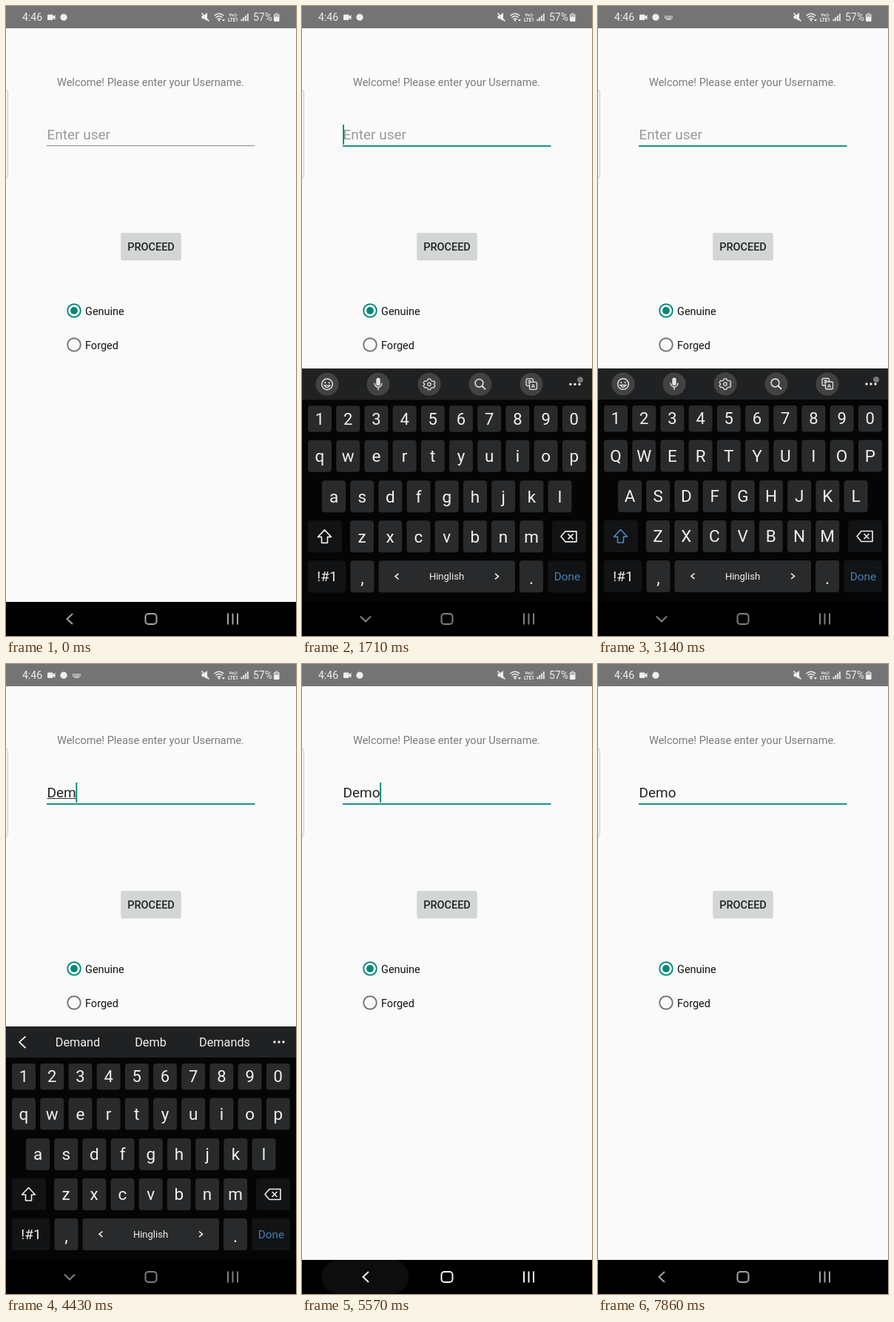
An HTML page for the animation above (8 s loop, 392 by 850 pixels).

```html
<!DOCTYPE html>
<html>
<head>
<meta charset="utf-8">
<style>
html, body { margin: 0; width: 100%; height: 100%; overflow: hidden; background: #fafafa }
svg { display: block; width: 392px; height: 850px; font-family: Roboto, "Noto Sans", sans-serif }
</style>
</head>
<body>
<svg id="stage" viewBox="0 0 392 850"></svg>
<script>
const TEAL = '#048878', KEY = '#292a2b', FUNC = '#121314', LIGHT = '#f0f0f0';
const stage = document.getElementById('stage');
const $ = id => document.getElementById(id);

const text = (x, y, s, size, fill, extra = '') =>
  `<text x="${x}" y="${y}" font-size="${size}" fill="${fill}" ${extra}>${s}</text>`;
const mid = (x, y, s, size, fill, extra = '') => text(x, y, s, size, fill, 'text-anchor="middle" ' + extra);
const rect = (x, y, w, h, fill, r = 0, extra = '') =>
  `<rect x="${x}" y="${y}" width="${w}" height="${h}" rx="${r}" fill="${fill}" ${extra}/>`;
const circle = (x, y, r, fill, extra = '') => `<circle cx="${x}" cy="${y}" r="${r}" fill="${fill}" ${extra}/>`;
const line = (d, color, w = 1.5, extra = '') =>
  `<path d="${d}" fill="none" stroke="${color}" stroke-width="${w}" ${extra}/>`;
const fill = (d, color) => `<path d="${d}" fill="${color}"/>`;
const group = (id, body) => `<g id="${id}">${body}</g>`;

function statusBar() {
  const c = '#eee';
  const bars = [0, 1, 2, 3].map(i => rect(317.5 + i * 2.8, 17.5 - i * 2.4, 1.8, 2.8 + i * 2.4, c)).join('');
  const dots = [0, 1, 2, 3, 4, 5].map(i => rect(90 + i * 1.9, 13.2, 1.3, 1.4, c) + rect(90 + i * 1.9, 15.4, 1.3, 1.4, c)).join('');
  return rect(0, 0, 392, 30, '#747474') + text(22, 20, '4:46', 14, c)
    + rect(56, 11.5, 7.5, 7.5, c, 1) + fill('M63 14.5L66.5 12V18.5L63 16Z', c)
    + circle(78, 15.2, 4.6, c)
    + group('keyIcon', dots + rect(92, 17.4, 7, 1.2, c))
    + fill('M264.5 13H267L272 9V20L267 17H264.5Z', c) + line('M264.5 9.5L274.5 20.5', c)
    + line('M281.5 13Q288 7.5 294.5 13M283.5 15.5Q288 11.5 292.5 15.5M285.5 18Q288 15.8 290.5 18', c, 1.4)
    + circle(288, 19.5, 1.2, c) + fill('M292 18h4l-2 3z', c)
    + mid(307, 14.2, 'Vo))', 6, c, 'font-weight="700"') + mid(307, 21.3, 'LTE1', 6.4, c, 'font-weight="700"')
    + bars + text(334, 20, '57%', 14, c)
    + rect(362, 11, 7.5, 10, c, 1) + rect(364, 9.2, 3.5, 2, '#b5b5b5') + rect(363, 11.6, 5.5, 3, '#aaa');
}

const radio = (id, y, label) => circle(92, y, 0, '#000', `id="${id}Ripple"`)
  + circle(92, y, 8.8, 'none', `id="${id}Ring" stroke-width="1.9"`)
  + circle(92, y, 0, TEAL, `id="${id}Dot"`) + text(107, y + 5.6, label, 14.5, '#111');

function form() {
  return rect(-8, 113.5, 10.5, 119, '#f4f4f4', 3, 'stroke="#ccc"')
    + mid(195.5, 108, 'Welcome! Please enter your Username.', 14.55, '#7b7b7b')
    + text(55.5, 180, '', 19, '#222', 'id="user"')
    + rect(55.5, 181, 0, 1, '#333', 0, 'id="compose"')
    + rect(55, 188, 281.5, 1, '#888', 0, 'id="under"')
    + rect(55, 160, 1.9, 27, TEAL, 0, 'id="caret"')
    + rect(155.5, 307.5, 81, 36, '#000', 2, 'opacity=".09"') + rect(155, 306.5, 82, 36.5, '#000', 2, 'opacity=".08"')
    + rect(156, 306, 80, 36, '#d3d7d4', 1.5)
    + mid(196, 329.5, 'PROCEED', 14.5, '#222', 'font-weight="500"')
    + radio('genuine', 411, 'Genuine') + radio('forged', 457, 'Forged');
}

function tools() {
  const c = '#e4e4e4';
  const gear = line('M170.2 502.5h3.6l.8 2.3 2.3 1.3 2.3-.5 1.8 3-1.7 1.7v1l1.7 1.7-1.8 3-2.3-.5-2.3 1.3-.8 2.2h-3.6'
    + 'l-.8-2.2-2.3-1.3-2.3.5-1.8-3 1.7-1.7v-1l-1.7-1.7 1.8-3 2.3.5 2.3-1.3z', c, 1.4)
    + circle(172, 510.7, 2.5, 'none', `stroke="${c}" stroke-width="1.4"`);
  return [34, 103, 172, 241, 310].map(x => circle(x, 510, 15.5, '#414242')).join('')
    + circle(34, 510, 7.3, 'none', `stroke="${c}" stroke-width="1.5"`) + circle(31.3, 508, 1.1, c) + circle(36.7, 508, 1.1, c)
    + line('M30 511.5Q34 517 38 511.5Z', c, 1.3)
    + rect(100.3, 501.5, 5.4, 10.5, c, 2.7) + line('M98 508.5a5 5.5 0 0 0 10 0M103 514v4', c, 1.4)
    + `<g transform="translate(172 510) scale(.88) translate(-172 -510.7)">${gear}</g>`
    + circle(239.5, 508.5, 5.4, 'none', `stroke="${c}" stroke-width="1.6"`) + line('M243.5 512.5L248 517', c, 1.8)
    + rect(303, 502.5, 9.5, 9.5, 'none', 2, `stroke="${c}" stroke-width="1.3"`)
    + rect(307.5, 507, 10, 10, '#414242', 2, `stroke="${c}" stroke-width="1.3"`)
    + mid(312.5, 515, 'A', 8, c, 'font-weight="700"') + line('M305 505.5h5M307.5 504v2l-2 3', c, 1)
    + circle(376, 504, 4, '#777');
}

function keyRow(chars, x, y, h, size) {
  return [...chars].map((ch, i) => {
    const cx = x + i * 38.2;
    return rect(cx - 16, y, 32, h, KEY, 4)
      + mid(cx, y + h / 2 + size * 0.35, ch, size, LIGHT, /[a-z]/.test(ch) ? 'class="letter"' : '');
  }).join('');
}

function keyboard() {
  const wide = (x, w, y, c = FUNC) => rect(x, y, w, 43, c, 4);
  return rect(0, 489, 392, 361, '#050506') + rect(0, 489, 392, 42, '#202122')
    + group('tools', tools())
    + group('words', line('M26.5 502.5L18 510.2L26.5 518', LIGHT, 1.7)
      + [97, 195.5, 295.5].map(x => mid(x, 516, '', 16.25, LIGHT, 'class="word"')).join(''))
    + [363, 369, 375].map(x => circle(x, 510, 1.7, LIGHT)).join('')
    + keyRow('1234567890', 24, 539, 35.5, 22)
    + keyRow('qwertyuiop', 24, 585.5, 43, 22.5)
    + keyRow('asdfghjkl', 43, 640, 43, 22.5)
    + keyRow('zxcvbnm', 81, 694, 43, 22.5)
    + wide(8, 46, 694) + wide(338, 46, 694) + wide(8, 51, 748) + wide(65.5, 32, 748, KEY)
    + wide(103.5, 184.5, 748, KEY) + wide(294, 32, 748, KEY) + wide(332.5, 51.5, 748)
    + line('M30.5 706.5L21.5 716H26.5V724H34.5V716H39.5Z', LIGHT, 1.6, 'id="shift" stroke-linejoin="round"')
    + line('M356 708.5H371V722.5H356L350 715.5Z', LIGHT, 1.6, 'stroke-linejoin="round"')
    + line('M359.5 712L366.5 719M366.5 712L359.5 719', LIGHT, 1.6)
    + mid(34, 776, '!#1', 19, LIGHT) + mid(81.5, 780, ',', 23, LIGHT) + mid(310, 780, '.', 23, LIGHT)
    + line('M130.5 765.5L126 769.2L130.5 773M261 765.5L265.5 769.2L261 773', LIGHT, 1.6)
    + mid(195.5, 774, 'Hinglish', 13, LIGHT) + mid(358.5, 775, 'Done', 15.4, '#4380b8');
}

const navBar = () => rect(0, 804, 392, 46, '#000') + rect(27, 804, 117, 46, '#fff', 22, 'id="pill"')
  + group('nav', '<path id="back" stroke-width="2"/>'
    + rect(188.5, 820, 15, 14, 'none', 4, 'stroke-width="2"')
    + '<path d="M300 819.5V834.5M306.5 819.5V834.5M313 819.5V834.5" stroke-width="2"/>');

stage.innerHTML = rect(0, 0, 392, 850, '#fafafa') + form() + statusBar() + group('keyboard', keyboard()) + navBar();

const set = (id, attrs) => { for (const k in attrs) $(id).setAttribute(k, attrs[k]); };
const show = (id, on) => set(id, { visibility: on ? 'visible' : 'hidden' });
const clamp = v => Math.max(0, Math.min(1, v));
const ease = v => 1 - (1 - clamp(v)) ** 3;
const within = (t, a, b) => t >= a && t < b;

// start time, typed text, suggestions
const typing = [
  [0, '', ['', '', '']],
  [3570, 'D', ['Do', 'Did', 'Day']],
  [4000, 'De', ['Dear', 'Den', 'Deal']],
  [4290, 'Dem', ['Demand', 'Demb', 'Demands']],
  [4710, 'Demo', ['Demon', 'Demo', 'Demos']]
];
const letters = [...document.querySelectorAll('.letter')].map(el => [el, el.textContent]);
const wordEls = document.querySelectorAll('.word');

function drawRadio(id, level, age) {
  set(id + 'Ring', { stroke: level > 0.5 ? TEAL : '#747474' });
  set(id + 'Dot', { r: 4.9 * level });
  set(id + 'Ripple', { r: age < 0 ? 0 : 19 * ease(age / 200), opacity: 0.13 * clamp((450 - age) / 250) });
}

function draw(t) {
  const focused = t >= 1290, typed = t >= 3570, caps = within(t, 2290, 3570);
  const [, value, words] = typing.filter(s => t >= s[0]).pop();

  const user = $('user');
  user.textContent = value || 'Enter user';
  set('user', { fill: value ? '#222' : '#999' });
  const width = value ? user.getComputedTextLength() : 0;
  set('compose', { width: t < 5140 ? width : 0 });
  set('caret', { x: 55.1 + width });
  show('caret', within(t, 1290, 1860) || within(t, 2430, 2860) || within(t, 3290, 5860)
    || within(t, 6290, 6790) || within(t, 7290, 7860));
  set('under', { height: focused ? 1.8 : 1, fill: focused ? TEAL : '#888' });

  const up = t < 5100 ? ease((t - 1350) / 400) : 1 - clamp((t - 5100) / 300) ** 2;
  set('keyboard', { transform: `translate(0 ${361 * (1 - up)})` });
  show('keyboard', up > 0);
  show('keyIcon', within(t, 2140, 5290));
  show('tools', !typed);
  show('words', typed && up > 0);
  wordEls.forEach((el, i) => el.textContent = words[i]);
  letters.forEach(([el, ch]) => el.textContent = caps ? ch.toUpperCase() : ch);
  set('shift', { stroke: caps ? '#4a8cc8' : LIGHT });

  const open = within(t, 1430, 5290);
  set('back', { d: open ? 'M79 823.5L86 830.5L93 823.5' : 'M90 820L82.5 827L90 834' });
  set('nav', { stroke: within(t, 5000, 7430) ? '#f2f2f2' : open ? '#808080' : '#a5a5a5', fill: 'none' });
  set('pill', { opacity: t < 5000 ? 0 : 0.05 * clamp((5900 - t) / 300) });

  const forged = clamp((t - 6430) / 130) - clamp((t - 6930) / 130);
  drawRadio('forged', forged, t - 6340);
  drawRadio('genuine', 1 - forged, t - 6840);
}

function tick() {
  draw(performance.now() % 8000);
  requestAnimationFrame(tick);
}
tick();
</script>
</body>
</html>
```
